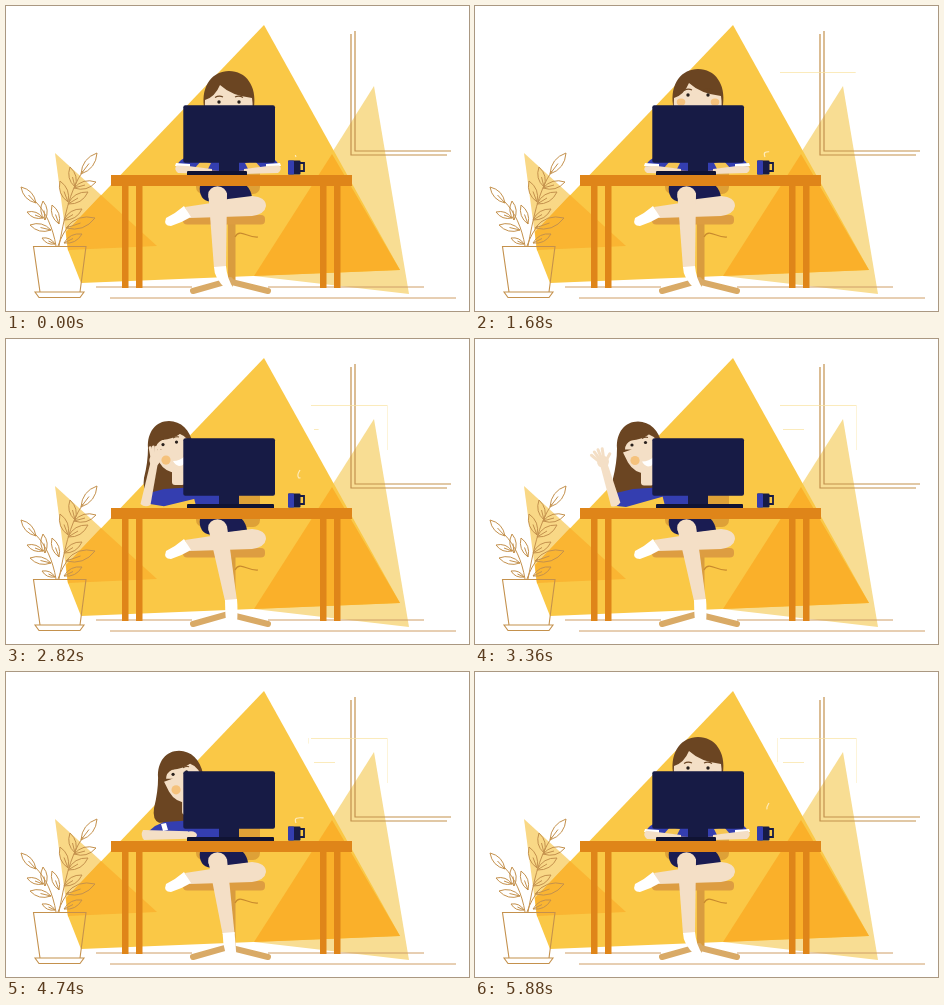
Write an HTML page with a canvas that moves like this. It is 463 px wide and 305 px high and loops after 5940 ms.

```html
<!DOCTYPE html>
<html lang="en">
<head>
<meta charset="utf-8">
<title>Desk wave</title>
<style>
html, body { margin: 0; width: 100%; height: 100%; overflow: hidden; background: #fff; }
canvas { display: block; width: 463px; height: 305px; }
</style>
</head>
<body>
<canvas id="stage"></canvas>
<script>
const W = 463, H = 305, LOOP = 5940;
const cv = document.getElementById('stage');
const ratio = window.devicePixelRatio || 1;
cv.width = W * ratio;
cv.height = H * ratio;
const c = cv.getContext('2d');

const SKIN = '#f4dfc6', HAIR = '#6b4522', NAVY = '#171b45', BLUE = '#343eb0';
const WOOD = '#df8519', TAN = '#d9aa66', LINE = '#c4914d', CHEEK = '#f5c27c', INK = '#28201c';

const clamp = v => Math.max(0, Math.min(1, v));
const mix = (a, b, p) => a + (b - a) * p;
function ease(t, a, b) {
  const p = clamp((t - a) / (b - a));
  return p * p * (3 - 2 * p);
}
function poly(color, ...p) {
  c.beginPath();
  for (let i = 0; i < p.length; i += 2) c.lineTo(p[i], p[i + 1]);
  c.closePath();
  c.fillStyle = color;
  c.fill();
}
function box(color, x, y, w, h, r = 0) {
  c.beginPath();
  c.roundRect(x, y, w, h, r);
  c.fillStyle = color;
  c.fill();
}
function dot(color, x, y, rx, ry = rx) {
  c.beginPath();
  c.ellipse(x, y, rx, ry, 0, 0, 7);
  c.fillStyle = color;
  c.fill();
}
function shape(color, d) {
  c.fillStyle = color;
  c.fill(new Path2D(d));
}
function stroke(color, width, d) {
  c.strokeStyle = color;
  c.lineWidth = width;
  c.stroke(new Path2D(d));
}

function triangles() {
  poly('#f9d886', 49, 147, 151, 240, 62, 245);
  poly('#f8dd93', 368, 80, 403, 288, 248, 270);
  poly('#fac846', 258, 19, 394, 264, 75, 277, 62, 244, 60, 226);
  poly('#fab532', 95, 189, 151, 240, 62, 244, 60, 226);
  poly('#fab02a', 326, 148, 394, 264, 248, 270);
}

function roomLines() {
  stroke(LINE, 1.2, 'M345 28V149H441M349 25V145H445');
  stroke('#cf9e66', 1, 'M90 281H186M262 281H418M104 292H450');
}

// Each leaf: base x, base y, tip x, tip y
const LEAVES = [
  [75, 168, 91, 147], [69, 181, 64, 161], [62, 196, 54, 175], [68, 182, 90, 176],
  [62, 198, 82, 186], [58, 214, 76, 203], [60, 222, 89, 212], [58, 237, 76, 228],
  [30, 197, 15, 181], [39, 214, 37, 195], [37, 212, 21, 206], [45, 224, 24, 219],
  [53, 218, 46, 199], [49, 238, 36, 232]
];
function plant() {
  stroke(LINE, 1, 'M53 240C58 214 63 185 77 165M50 240C47 222 40 206 29 195M52 240Q57 226 63 220');
  for (const [x, y, u, v] of LEAVES) {
    const mx = (x + u) / 2, my = (y + v) / 2, nx = (v - y) * .33, ny = (x - u) * .33;
    stroke(LINE, 1, `M${x} ${y}Q${mx + nx} ${my + ny} ${u} ${v}Q${mx - nx} ${my - ny} ${x} ${y}L${mx} ${my}`);
  }
  stroke(LINE, 1.1, 'M27.5 240.5H80L74 286H34ZM29 286H78L74 291.5H33Z');
}

function chair() {
  box('#dea137', 190, 150, 64, 38, 7);
  box('#d99c3e', 222, 216, 7.5, 58);
  stroke('#c88a2e', 1.2, 'M229 231C234 222 241 232 252 231');
  c.lineCap = 'round';
  stroke(TAN, 6, 'M187 285L222 275L262 285M224 274V279');
  c.lineCap = 'butt';
  box('#dd9d41', 177, 209, 82, 9.5, 4);
}

function legs(p) {
  const hem = mix(246, 241, p);
  shape('#1a1c52', `M194 179H${hem - 6}Q${hem - 1} 184 ${hem} 191L205 196Q192 194 194 179Z`);
  shape(SKIN, 'M222 193L246 190Q260 191 260 200Q259 208 246 210L184 212L179 201L212 196Z');
  shape('#fff', 'M178 200Q170 207 160 212Q157 220 165 220Q175 217 185 211Z');
  const x = mix(214, 225, p);
  poly(SKIN, 202.5, 190, 221, 187, x + 6, 262, x - 6, 262);
  dot(SKIN, 211.5, 189, 9.4, 8.8);
  shape('#fff', `M${x - 6} 261L${x + 6} 260Q${x + 7} 273 ${mix(228, 231, p)} 283Q226 288 220 283Q${x - 6} 272 ${x - 6} 261Z`);
}

function frontHead(rise, p) {
  c.save();
  c.translate(-62 * p, 18 * p + 2 * (1 - rise));
  c.translate(223, 90);
  c.rotate(-.25 * p);
  c.translate(-223, -90);
  shape(HAIR, 'M198 99C195 77 207 63 223 63C240 63 251 78 248 99L249 145H197Z');
  const y = 89 + 5 * (1 - rise);
  shape(SKIN, 'M199 92Q209 89 214 77Q226 88 246 90Q249 110 238 121Q223 131 208 121Q197 108 199 92Z');
  dot(INK, 213, y, 1.7);
  dot(INK, 233, y, 1.7);
  stroke(HAIR, 1.1, `M209 ${y - 4.5}Q213 ${y - 7} 217 ${y - 5}M229 ${y - 5}Q233 ${y - 7} 237 ${y - 4.5}`);
  dot(CHEEK, 206, y + 7, 4.3, 3.5);
  dot(CHEEK, 240, y + 7, 4.3, 3.5);
  c.restore();
}

function leanHead(p, raise) {
  c.save();
  c.translate(46 * (1 - p), -10 * (1 - p) + 1.5 * raise);
  shape(HAIR, 'M142 108C141 92 150 81 163 81C175 81 184 90 187 104V153H143Q136 150 138 138Q142 122 142 108Z');
  box(SKIN, 166, 125, 13, 20, 3);
  shape(SKIN, 'M148 112Q165 107 174 94Q183 97 187 111Q190 132 174 133Q160 134 153 122Z');
  dot(INK, 157, 104.5, 1.6);
  dot(INK, 170.5, 102, 1.6);
  shape(SKIN, 'M150 109Q150 103 156 100Q167 99 174 94L177 109Z');
  dot(INK, 157, 104.5, 1.6);
  dot(INK, 170.5, 102, 1.6);
  stroke(HAIR, 1.1, 'M152 101.5Q154 99 158 99M167 98Q170 96 173 97');
  dot(CHEEK, 160, 120, 4.6);
  dot(CHEEK, 182, 116, 4.4);
  if (raise > .2) shape('#fff', 'M167 121Q174 121 179 116Q180 126 173 126Q169 125 167 121Z');
  else stroke('#b5543c', 1.1, 'M168 118Q172 120 177 115');
  c.restore();
}

function frontArms(t) {
  const tap = Math.sin(t * Math.PI * 2 / 270) * .7;
  for (const side of [-1, 1]) {
    c.save();
    c.translate(222, 0);
    c.scale(side, 1);
    shape(BLUE, 'M8 150H39Q48 153 51 159L50 163L8 165Z');
    poly('#f5c552', 17, 157, 27, 155, 33, 162, 20, 163);
    poly('#fff', 38, 158, 52, 157, 53, 160, 38, 162);
    shape(SKIN, `M16 163L40 160L51 ${159.5 + tap}Q55 163 50 167L16 168Z`);
    c.restore();
  }
}

function leanArm(raise, wave) {
  poly(BLUE, 186, 151, 214, 151, 214, 167, 190, 167);
  poly(BLUE, mix(149, 141, raise), 154, 158, 150, 190, 148, 190, mix(166, 157, raise),
    mix(176, 151, raise), mix(165, 168, raise), mix(143, 142, raise), mix(159, 167, raise));
  c.save();
  c.translate(140, 163);
  c.rotate(raise * (-1.88 + wave));
  const len = mix(42, 39, raise);
  c.beginPath();
  c.moveTo(-3, -5);
  c.lineTo(len, -3.7);
  c.lineTo(len, 3.7);
  c.lineTo(-2, 5);
  c.quadraticCurveTo(-6, 0, -3, -5);
  c.fillStyle = SKIN;
  c.fill();
  dot(SKIN, len + 3, 0, 6, mix(3.7, 6, raise));
  if (raise > .15) {
    c.lineCap = 'round';
    for (let i = 0; i < 5; i++) {
      const a = (-.72 + i * .31 + (i === 4 ? .4 : 0)) * raise;
      const r = i === 4 ? 11 : 14;
      stroke(SKIN, 3, `M${len + 2} ${i - 2}L${len + 2 + r * Math.cos(a)} ${r * Math.sin(a)}`);
    }
    c.lineCap = 'butt';
  }
  c.restore();
  if (raise < .3) poly('#fff', 155, 152, 160, 151, 162, 158, 157, 159);
}

function monitor(baseWidth) {
  box(NAVY, 213, 153, 20, 14);
  box('#101333', 181, 165, baseWidth, 5, 1);
  box(NAVY, 177.3, 99.3, 91.7, 57.4, 2);
}

function desk() {
  for (const x of [116, 130, 314, 328]) box(WOOD, x, 178, 6.5, 104);
  box(WOOD, 105, 169, 241, 11);
}

function mug() {
  stroke(NAVY, 1.8, 'M293 157H298V165H293');
  box(NAVY, 282, 154.5, 12.5, 14, 1);
  box(BLUE, 282, 154.5, 6, 14, 1);
}

const STEAM = 'M290 151C287 144 294 146 300 146C306 143 300 138 293 139C290 136 293 133 294 131';
function steam(t) {
  const q = t % (LOOP / 4) / (LOOP / 4);
  c.save();
  c.globalAlpha = .8 * (1 - ease(t, 2800, 3150) + ease(t, 3750, 4050));
  c.setLineDash([22, 80]);
  c.lineDashOffset = 20 - 54 * q;
  stroke('#fff4d8', 1.2, STEAM);
  c.restore();
}

function panel(t) {
  const a = ease(t, 1200, 1700), b = ease(t, 1800, 2250);
  const d = ease(t, 2700, 3100), e = ease(t, 4600, 5050);
  c.save();
  c.globalAlpha = .7;
  if (a) stroke('#fae3a0', 1, `M305 66.5H${305 + 76 * a}`);
  if (b) stroke('#fcefc9', 1, `M381.5 66V${66 + 45 * b}`);
  if (d) stroke('#fae3a0', 1, `M308 90.5H${308 + 21 * d}`);
  if (e) stroke('#fcefc9', 1, `M302.5 66V${66 + 24 * e}`);
  c.restore();
}

function draw(t) {
  const lean = ease(t, 1760, 2160) - ease(t, 4620, 5020);
  const raise = ease(t, 2560, 2960) - ease(t, 4360, 4660);
  const rise = ease(t, 1100, 1560) - ease(t, 4960, 5420);
  const wave = -.05 + .07 * Math.cos((t - 3360) * Math.PI * 2 / 640);
  const typing = lean < .5;

  c.setTransform(ratio, 0, 0, ratio, 0, 0);
  c.fillStyle = '#fff';
  c.fillRect(0, 0, W, H);
  triangles();
  roomLines();
  panel(t);
  plant();
  chair();
  legs(lean);
  if (typing) {
    frontHead(rise, lean);
    frontArms(t);
  } else {
    leanHead(lean, raise);
    leanArm(raise, wave);
  }
  monitor(typing ? 60 : 87);
  desk();
  mug();
  steam(t);
}

function tick(now) {
  draw(now % LOOP);
  requestAnimationFrame(tick);
}
draw(0);
requestAnimationFrame(tick);
</script>
</body>
</html>
```
